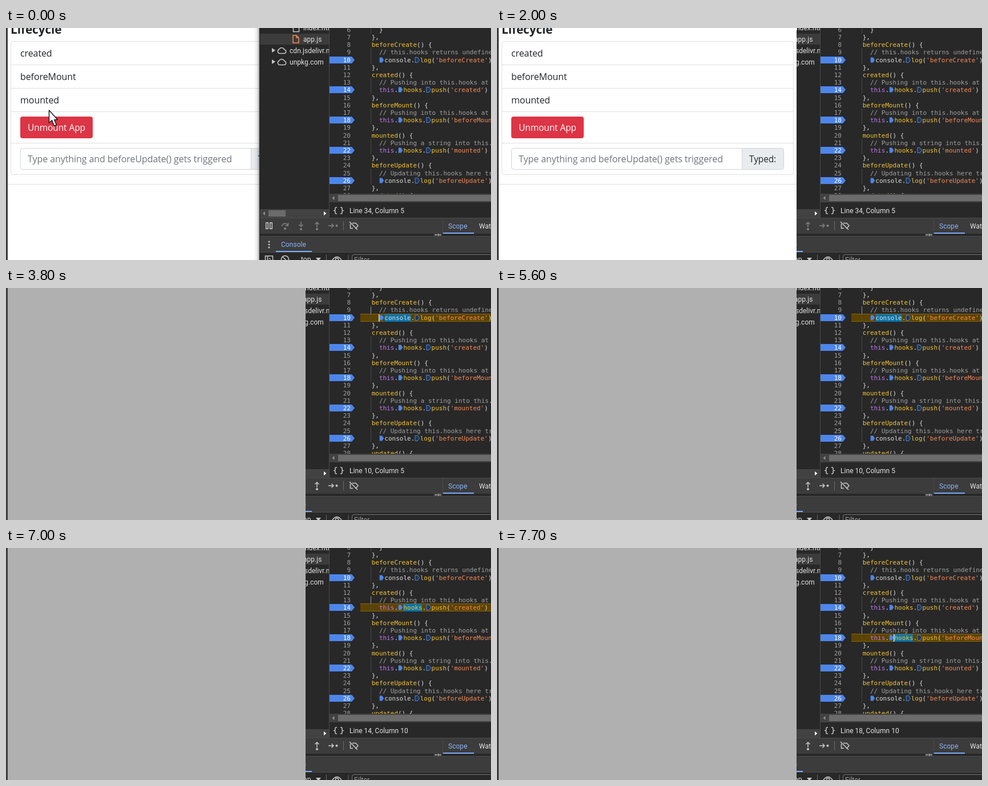
An HTML page that plays this animation: 850 by 406 pixels, repeating every 8000 ms.

```html
<!DOCTYPE html>
<html lang="en">
<head>
<meta charset="utf-8">
<title>Lifecycle hooks in the debugger</title>
<style>
html, body { margin: 0; width: 100%; height: 100%; overflow: hidden; background: #282828; }
svg { display: block; width: 850px; height: 406px; }
text { white-space: pre; }
.ui { font: 12px Roboto, sans-serif; letter-spacing: .04px; fill: #e3e3e3; }
.code { font: 11px "DejaVu Sans Mono", monospace; }
.page { font: 16px "Open Sans", sans-serif; letter-spacing: -.08px; fill: #212529; }
.v { fill: #dcdcdc; }
.f { fill: #f4c430; }
.k { fill: #bf7af0; }
.s { fill: #f58b57; }
.c { fill: #a0a0a0; }
.num { fill: #a0a0a0; text-anchor: end; }
.num.bp { fill: #fff; }
.blue { fill: #4d86ea; }
.off { fill: #24374f; stroke: #4d86ea; }
.icon { fill: none; stroke: #c7c7c7; stroke-width: 1.5; }
.solid { fill: #c7c7c7; stroke: none; }
.line { fill: none; stroke: #dfdfdf; }
.dim { opacity: .5; }
</style>
</head>
<body>
<svg viewBox="0 0 850 406">
  <defs>
    <clipPath id="codeClip"><rect x="567" width="283" height="290"/></clipPath>
    <clipPath id="treeClip"><rect x="445" width="121" height="317"/></clipPath>
    <clipPath id="pageClip"><rect id="pageArea" width="444" height="406"/></clipPath>
    <linearGradient id="shade">
      <stop offset="0" stop-opacity="0"/>
      <stop offset=".6" stop-opacity=".08"/>
      <stop offset="1" stop-opacity=".35"/>
    </linearGradient>
  </defs>

  <rect width="850" height="406" fill="#282828"/>

  <!-- file tree -->
  <g class="ui" clip-path="url(#treeClip)">
    <rect x="445" y="10" width="121" height="19" fill="#3c3c3c"/>
    <path d="M503.5 0V6.500H513.500V0" class="icon"/>
    <text x="521" y="4">index.html</text>
    <path d="M503 13h6l4 4v9h-10zM509 13v4h4" fill="none" stroke="#f08a57" stroke-width="1.500"/>
    <text x="521" y="24">app.js</text>
    <g id="cdn">
      <path d="M466 35l6 4-6 4z" class="solid"/>
      <path d="M479 44.500a4 4 0 0 1 0-7.500a5 5 0 0 1 9 1a3.300 3.300 0 0 1 0 6.500z" class="icon"/>
      <text x="497" y="44">cdn.jsdelivr.net</text>
    </g>
    <g id="unpkg">
      <path d="M466 55l6 4-6 4z" class="solid"/>
      <path d="M479 64.500a4 4 0 0 1 0-7.500a5 5 0 0 1 9 1a3.300 3.300 0 0 1 0 6.500z" class="icon"/>
      <text x="497" y="64">unpkg.com</text>
    </g>
  </g>
  <rect x="445" y="317" width="121" height="15" fill="#424242"/>
  <rect x="460" y="319" width="30" height="11" fill="#6b6b6b"/>
  <path d="M454 321v7l-4-3.500z" fill="#8b8b8b"/>
  <path d="M557 321v7l4.500-3.500z" fill="#fff"/>
  <path d="M566.500 0V332" stroke="#4a4a4a"/>

  <!-- editor -->
  <g id="editor">
    <g clip-path="url(#codeClip)">
      <g id="exec">
        <rect id="execRow" x="621" width="229" height="14" fill="#5c4300"/>
        <path id="execEdge" fill="none" stroke="#8a6508"/>
        <rect id="token" height="13" fill="#0b74a8"/>
      </g>
      <g id="lines" class="code"></g>
      <path id="guide" stroke="#9a9a9a"/>
      <rect id="caret" width="1.300" height="13" fill="#fff"/>
    </g>
    <rect x="567" y="290" width="283" height="15" fill="#424242"/>
    <rect x="582" y="292" width="268" height="11" fill="#6b6b6b"/>
    <path d="M575.500 294v7l-4-3.500z" fill="#8b8b8b"/>
    <text id="status" class="ui" x="602" y="324"></text>
  </g>
  <g id="loading">
    <path d="M567 305.500H850" stroke="#4a4a4a"/>
    <text class="ui" x="597" y="324" style="fill:#8f8f8f">Loading…</text>
    <rect x="652.500" y="316.500" width="99" height="5" rx="2.500" fill="#303030" stroke="#929292"/>
    <rect x="754" y="313" width="12" height="12" rx="1" fill="#e46962"/>
  </g>
  <path class="icon" d="M580 314h-1.500q-1.500 0-1.500 1.500v2q0 1.500-1.500 2q1.500 .5 1.500 2v2q0 1.500 1.500 1.500h1.500M586 314h1.500q1.500 0 1.500 1.500v2q0 1.500 1.500 2q-1.500 .5-1.500 2v2q0 1.500-1.500 1.500h-1.500"/>

  <!-- debugger toolbar -->
  <rect x="445" y="332" width="405" height="28" fill="#3c3c3c"/>
  <path d="M445 332.500H850M765.500 332V360" stroke="#4a4a4a"/>
  <path d="M455.700 340.700h3.600v10.600h-3.600zM462.700 340.700h3.600v10.600h-3.600z" class="icon"/>
  <g id="steps" class="icon">
    <path d="M483.500 347a5.500 5.500 0 0 1 10.500-1.500M494.500 341v5h-5M517 339v8M513.500 344l3.500 3.500 3.500-3.500M545 349v-9M541.500 343.500l3.500-3.500 3.500 3.500M565 346h8M570.500 342.500l3.500 3.500-3.500 3.500"/>
    <g class="solid"><circle cx="489" cy="351" r="2"/><circle cx="517" cy="352" r="2"/><circle cx="545" cy="352" r="2"/><circle cx="579.500" cy="346" r="2"/></g>
  </g>
  <path d="M591.500 338V354" stroke="#6a6a6a"/>
  <path d="M607 341.500h6l4 4.500-4 4.500h-1M608 350.500h-4.500v-8M602 339l14 14" class="icon"/>
  <g class="ui"><text x="775" y="351" style="fill:#8ab4f8">Scope</text><text x="829" y="351">Watch</text></g>
  <rect x="766" y="358" width="54" height="2" fill="#7cacf8"/>
  <rect x="445" y="360" width="405" height="4" fill="#282828"/>
  <rect x="750" y="360" width="14" height="4" fill="#4a4a4a"/>
  <path d="M752 362h3M759 362h3M757.500 360v4" stroke="#e3e3e3"/>

  <!-- console drawer -->
  <rect x="445" y="364" width="405" height="28" fill="#3c3c3c"/>
  <path d="M445 364.500H850M445 392.500H850" stroke="#4a4a4a"/>
  <g class="solid"><circle cx="461" cy="374" r="1.500"/><circle cx="461" cy="379" r="1.500"/><circle cx="461" cy="384" r="1.500"/></g>
  <text class="ui" x="482" y="383" style="fill:#8ab4f8">Console</text>
  <rect x="473" y="390" width="63" height="2" fill="#7cacf8"/>
  <g class="icon">
    <path d="M454.500 406v-7h13v7M458.500 399v7M461 403l3 2M572 406q8-11 16 0M484.500 400l9 9"/>
    <circle cx="489" cy="405" r="6.500"/><circle cx="580" cy="405" r="2.500"/>
  </g>
  <path d="M561.500 397V406M600 397V406" stroke="#6a6a6a"/>
  <text class="ui" x="517" y="409">top</text>
  <path d="M543 402h9l-4.500 6z" class="solid"/>
  <path d="M606.500 406v-6q0-3.500 3.500-3.500H850" fill="none" stroke="#757575"/>
  <text class="ui" x="610" y="410" style="fill:#9a9a9a">Filter</text>

  <!-- web page -->
  <g clip-path="url(#pageClip)">
    <rect id="paper" width="525" height="406" fill="#fff"/>
    <g id="app" class="page">
      <text x="8" y="10" style="font-size:20.800px;font-weight:700">Lifecycle</text>
      <rect x="8.500" y="23.500" width="511" height="233" rx="4" class="line"/>
      <path d="M9 64.500H519M9 105.500H519M9 146.500H519M9 201.500H519M3 273.500H525" class="line"/>
      <text x="25" y="50">created</text>
      <text x="25" y="91">beforeMount</text>
      <text x="25" y="132">mounted</text>
      <rect x="25" y="155" width="127" height="38" rx="4" fill="#dc3545"/>
      <text x="38" y="180" style="font-size:15.500px;fill:#fff">Unmount App</text>
      <path d="M429.500 210.500H498.500q4 0 4 4V243.500q0 4-4 4H429.500z" fill="#e9ecef" stroke="#ced4da"/>
      <path d="M429.500 210.500H29.500q-4 0-4 4V243.500q0 4 4 4H429.500z" fill="#fff" stroke="#ced4da"/>
      <text x="38" y="235" style="fill:#6c757d">Type anything and beforeUpdate() gets triggered</text>
      <text x="442" y="235" style="font-size:15.400px;font-weight:500">Typed:</text>
    </g>
    <rect width="3" height="406" fill="#3c3c3c"/>
  </g>
  <rect id="edge" x="434" width="10" height="406" fill="url(#shade)"/>
  <path id="pointer" d="M0 0V22L5 17.500L9 27.500L13 25.500L9 16.500H15z" fill="#fff" stroke="#1c1c1c" stroke-width="1.500" stroke-linejoin="round"/>
</svg>

<script>
const LOOP = 8000, CHAR = 6.6226, MARK = 9.4, PITCH = 13.2, COL0 = 627.4;
const $ = id => document.getElementById(id);
const set = (id, attrs) => { for (const k in attrs) $(id).setAttribute(k, attrs[k]); };
const show = (id, on) => { $(id).style.display = on ? '' : 'none'; };
// Rows sit on whole pixels although the pitch is fractional.
const rowY = n => Math.floor(56.01 + (n - 10) * PITCH);

// A token is a class letter plus text; "*" and "o" are breakpoint markers.
const head = name => [2, ['f' + name, 'v() {']];
const note = text => [4, ['c// ' + text]];
const end = [2, ['v},']];
const log = name => [4, ['*', 'vconsole.', 'o', 'flog', 'v(', `s'${name}'`, 'v)']];
const push = name => [4, ['kthis', 'v.', '*', 'fhooks', 'v.', 'o', 'fpush', 'v(', `s'${name}'`, 'v)']];
const source = [
  [4, ['v}']], end,
  head('beforeCreate'), note('this.hooks returns undefined'), log('beforeCreate'), end,
  head('created'), note('Pushing into this.hooks at this'), push('created'), end,
  head('beforeMount'), note('Pushing into this.hooks at this'), push('beforeMount'), end,
  head('mounted'), note('Pushing a string into this.hooks'), push('mounted'), end,
  head('beforeUpdate'), note('Updating this.hooks here triggers'), log('beforeUpdate'), end,
  head('updated')
];

function lineMarkup([indent, tokens], i) {
  const n = i + 6, y = rowY(n), base = y + 4, stop = n >= 10 && n % 4 === 2;
  let x = COL0 + indent * CHAR, out = '';
  if (stop) out += `<path class="blue" d="M567 ${y - 6}h39l5 6l-5 6h-39z"/>`;
  out += `<text class="num${stop ? ' bp' : ''}" x="604" y="${base}">${n}</text>`;
  if (indent > 2) out += `<path d="M639.500 ${y - 7}v14" stroke="#4a4a4a"/>`;
  for (const token of tokens) {
    if (token === '*' || token === 'o') {
      out += `<path class="${token === '*' ? 'blue' : 'off'}" d="M${x + .8} ${y - 4.5}h4.500l3 4.500l-3 4.500h-4.500z"/>`;
      x += MARK;
    } else {
      out += `<text class="${token[0]}" x="${x}" y="${base}">${token.slice(1)}</text>`;
      x += (token.length - 1) * CHAR;
    }
  }
  return out;
}
$('lines').innerHTML = source.map(lineMarkup).join('');

// Blink and repaint times in ms.
const between = (t, spans) => spans.some(([a, b]) => t >= a && t < b);
const caretOn = [[2900, 3200], [3800, 4400], [4900, 5600], [6100, 7000], [7500, 8000]];
const blank = [[2300, 2400], [6100, 6200], [7500, 7600]];

function drawPointer(t) {
  const k = Math.floor(t / 100);
  show('pointer', k < 10);
  set('pointer', { transform: `translate(${75.5 + 6.5 * k} ${144 + 18 * k - 4.04 * k * k})` });
}

function drawExec(n) {
  show('exec', n);
  show('guide', n);
  if (!n) return;
  const y = rowY(n), first = n === 10, x = first ? 663.3 : 696;
  set('execRow', { y: y - 7 });
  set('execEdge', { d: `M621 ${y - 6.5}H850M621 ${y + 6.5}H850` });
  set('token', { x, y: y - 6, width: CHAR * (first ? 7 : 5) });
  set('guide', { d: `M639.500 ${y - 19.5}v13` });
  set('caret', { x: first ? 653.2 : 695, y: y - 6 });
}

function draw(t) {
  const loaded = t < 2300 || t >= 2900;
  const line = t < 2900 ? 0 : t < 6400 ? 10 : t < 7700 ? 14 : 18;
  const scroll = `translate(0 ${line ? -4 : 0})`;
  drawPointer(t);
  drawExec(line);
  for (const id of ['lines', 'exec', 'guide', 'caret']) set(id, { transform: scroll });
  show('caret', line && between(t, caretOn));
  show('editor', loaded);
  show('loading', !loaded);
  show('cdn', loaded);
  set('unpkg', { transform: `translate(0 ${loaded ? 0 : -20})` });
  $('status').textContent = `Line ${line || 34}, Column ${line > 10 ? 10 : 5}`;
  $('steps').classList.toggle('dim', t < 2400);
  show('app', t < 2300);
  show('edge', t < 2000);
  set('pageArea', { width: t < 2000 ? 444 : 525 });
  set('paper', { fill: t < 2300 || between(t, blank) ? '#fff' : '#b0b0b0' });
}

const start = performance.now();
function tick() {
  draw((performance.now() - start) % LOOP);
  requestAnimationFrame(tick);
}
tick();
</script>
</body>
</html>
```
